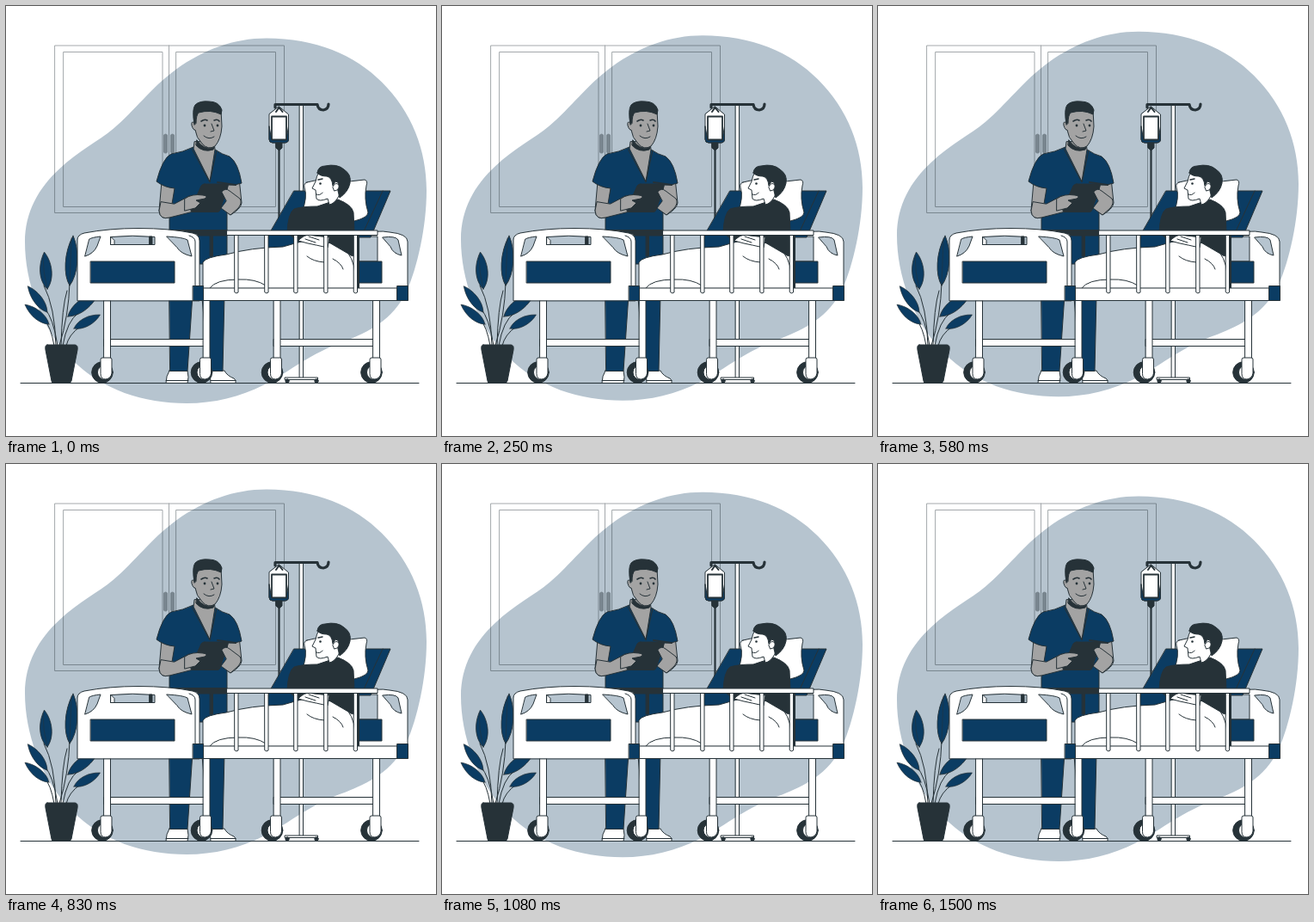
Animation, 500 px wide and 500 px high, one loop 1540 ms. Source, as an HTML page:

```html
<!DOCTYPE html>
<html lang="en">
<head>
<meta charset="utf-8">
<title>Hospital visit</title>
<style>
  html, body { margin: 0; width: 100%; height: 100%; overflow: hidden; background: #fff; }
  svg { display: block; width: 100%; height: 100%; }
  .art { stroke: #263238; stroke-width: 1; stroke-linejoin: round; stroke-linecap: round; }
  .line { fill: none; }
  .white { fill: #fff; }
  .navy { fill: #0b3c63; }
  .dark { fill: #263238; }
  .skin { fill: #a3a3a3; }
  .sky { fill: #b6c4cf; }
</style>
</head>
<body>
<svg viewBox="0 0 500 500">
  <defs>
    <g id="post"><path class="white" d="M0 266h4v67q-2 2-4 0z"/></g>
    <g id="leg">
      <path class="white" d="M0 342h7.500v70H0z"/>
      <circle class="dark" cx="-2" cy="426" r="12.300"/>
      <circle class="white" cx="1" cy="426" r="8.500"/>
      <path class="white" d="M-4 411q0-2 2-2H7q2 0 2 2v16q-1 6-7 7-6 0-6-6z"/>
    </g>
    <g id="frame">
      <path class="white" d="M0 387.500h120v8H0z"/>
      <use href="#leg"/>
      <use href="#leg" x="115.500"/>
    </g>
    <path id="leaf" d="M0 0C-8-9-9-27 1-43 9-31 10-11 0 0z"/>
  </defs>

  <path id="blob" class="sky" d="M303 38C360 38 405 57 437 89C472 124 489 168 489 215C489 258 478 305 466 332C450 366 420 380 395 390C352 405 333 424 300 441C272 455 242 462.500 210 462.500C160 462.500 112 447 77 412C40 375 22 320 22 275C22 240 38 212 62 190C85 168 106 159 125 143C150 122 168 96 198 74C230 51 265 38 303 38Z"/>

  <g class="art">
    <!-- cabinet -->
    <g opacity=".42">
      <path class="line" d="M57 46H323.500V240.500H57zM67 53.500H182V233.500H67zM198 53.500H313.500V233.500H198zM189.500 46V240.500"/>
      <path class="dark" stroke="none" d="M183 150q2.500-3 5 0v20q-2.500 3-5 0zM191 150q2.500-3 5 0v20q-2.500 3-5 0z"/>
    </g>
    <path class="line" d="M17 438.500H480"/>

    <!-- drip stand -->
    <path class="white" d="M341.500 114h4v319h-4z"/>
    <path class="white" d="M324.500 432h38v2.500h-38z"/>
    <circle class="dark" cx="327" cy="436" r="2.200"/><circle class="dark" cx="361" cy="436" r="2.200"/>
    <path class="line" stroke-width="3.200" d="M313 118V114.500H362Q363 121 369 121Q375 120 375 114"/>
    <path class="line" stroke-width="2.200" d="M317.500 166V250"/>
    <path class="white" d="M317.500 117L328.500 126V155Q328.500 159 324 159H310Q306 159 306 155V126z"/>
    <path class="navy" d="M306 140V155Q306 159 310 159H324Q328.500 159 328.500 155V140L326 155H309z"/>
    <path class="white" stroke-width="1.800" d="M309 128.500H326V155.500H309z"/>
    <path class="line" stroke-width="2" d="M314 123l3.500-5 4 5"/>
    <path class="dark" d="M314 159h7v6l-3.500 3-3.500-3z"/>

    <!-- plant -->
    <path class="line" d="M58 395Q57 350 44 325M60 395Q55 362 45 352M62 395Q73 360 74 322M56 395Q52 372 45 366M66 395Q71 366 84 357M70 395Q73 382 86 373M64 395Q65 350 71 331"/>
    <g class="navy" stroke-width=".8">
      <use href="#leaf" transform="translate(48 329) rotate(-6)"/>
      <use href="#leaf" transform="translate(74 325) rotate(3) scale(1 1.350)"/>
      <use href="#leaf" transform="translate(48 356) rotate(-38) scale(.75 .88)"/>
      <use href="#leaf" transform="translate(50 370) rotate(-52) scale(.75 .84)"/>
      <use href="#leaf" transform="translate(72 361) rotate(51) scale(.95 1.050)"/>
      <use href="#leaf" transform="translate(79 375) rotate(61) scale(.75 .8)"/>
    </g>
    <path class="line" stroke-width=".5" d="M48 329Q43 310 43 290M74 325Q75 300 76 270"/>
    <path class="dark" d="M48 394H80Q84 394 83 400L76 436Q75 438.500 73 438.500H56Q53 438.500 53 436L46 400Q45 394 48 394z"/>

    <!-- nurse -->
    <path class="white" d="M190 424h21q2 8 0 14.500H186q0-8 4-14.500zM238 424h16q3 6 11 9 3 2 2 5.500H238q-1-8 0-14.500z"/>
    <path class="line" d="M186 435.500h26M238 435.500h29"/>
    <path class="navy" d="M190 335H217L211 424.500H191zM228 335H254L252 424.500H236z"/>
    <path class="skin" d="M181 204L178 238Q179 249 190 246L230 236 234 222 213 221 194 231 198 204z"/>
    <path class="skin" d="M256 200H271L274 229Q273 236 261 243L249 234 250 216 257 213z"/>
    <path class="navy" d="M218 164Q206 170 192 172Q182 177 175 204Q184 211 196 212L190 248V300H257V242L256 208Q266 209 274 206Q270 182 260 175Q252 173 243 167z"/>
    <path class="skin" d="M180 228L178 238Q179 249 190 246L230 236 234 222 213 221 196 230z"/>
    <path class="skin" d="M219 158L218 166 237 204 243 167 242 158z"/>
    <path class="line" d="M216 166L237 205 245 168"/>
    <path class="dark" d="M222 156Q231 169 242 164L241 167Q229 171 221 162z"/>
    <path class="skin" d="M219 122L219 136Q215 133 216 139 218 145 220 144Q221 153 228 160 235 168 243 163 250 155 251 140L250 120z"/>
    <path class="dark" d="M219 138Q216 120 220 115 225 110 236 111 248 111 251 121L250 126Q238 120 224 124 221 127 221 136z"/>
    <path class="line" stroke-width="1.600" d="M227 134q4-3 7-1M242 133q4-2 6 1"/>
    <path class="line" d="M239 137l3 8-4 1M230 151q6 5 12 1"/>
    <circle class="dark" stroke="none" cx="231" cy="139" r="1.400"/><circle class="dark" stroke="none" cx="246" cy="139" r="1.400"/>
    <path class="dark" d="M231 207H257Q259 207 258 210L249 237Q248 239.500 246 239.500H217Q214 239 215 236L227 209Q228 207 231 207z"/>
    <path class="skin" d="M208 224Q216 218 229 220 236 221 231 224L221 226 226 229 220 235 208 238zM251 216Q255 211 260 215L272 224Q275 229 270 235L261 243 250 235 256 227z"/>
    <path class="line" stroke-width="2" d="M246 205L267 208"/>

    <!-- far rail -->
    <path class="dark" d="M167 260.500H257V267H167zM237.500 267h3v24h-3z"/>

    <!-- headboard and backrest -->
    <path class="white" d="M408 342V266Q432 260 446 263 467 265 467 274V342z"/>
    <path class="sky" d="M410 268H432V297H410zM438 269Q453 267 456 272L460 290Q450 288 447 280z"/>
    <path class="navy" d="M408 297H437V322H408zM335 215H447L424 269H404L390 294H300L306 265z"/>
    <path class="line" d="M438 215L416 262"/>

    <!-- patient -->
    <path class="white" d="M350 205Q368 200 385 203 402 205 417 202 421 203 419 209 416 224 421 240 421 246 405 250L344 240Q351 222 347 211 346 206 350 205z"/>
    <path class="white" d="M229 328V298Q232 292 256 289 284 281 322 280L350 272 395 278Q410 288 410 328z"/>
    <path class="line" d="M237 328Q244 318 270 318 290 317 302 325M350 291q7 6 20 7M392 281q12 10 14 30M380 294q10 5 12 12"/>
    <path class="dark" d="M327 263Q328 241 335 236 344 233 362 233L386 225Q402 231 404 240L406 286Q405 294 398 288L374 274H340z"/>
    <path class="white" d="M343 270Q350 264 358 267L376 269 374 281Q361 278 351 276L340 273z"/>
    <path class="line" d="M348 271l12 4M352 268l12 4"/>
    <path class="white" d="M364 193Q361 198 360 204L356 212 360 214 361 224Q364 228 374 224L376 231Q382 230 387 221L390 208 384 196z"/>
    <path class="dark" d="M362 194Q363 186 371 186 385 183 393 190 402 196 400 206 398 216 388 223L385 211Q389 205 383 204L380 209Q379 199 373 198 365 198 362 194z"/>
    <path class="white" d="M380 210q3-6 7-2 1 6-5 7z"/>
    <path class="line" d="M361 219q4 2 7-2"/>
    <path class="line" stroke-width="1.500" d="M363 202l5-1"/>
    <circle class="dark" stroke="none" cx="365.500" cy="206.500" r="1.300"/>

    <!-- bed -->
    <use href="#frame" x="114"/>
    <use href="#frame" x="311.500"/>
    <path class="dark" d="M408 266h2.500v62h-2.500z"/>
    <path class="white" d="M229 328H455V342.500H229z"/>
    <path class="navy" d="M455 325.500H467.500V342.500H455z"/>
    <use href="#post" x="266"/><use href="#post" x="301"/><use href="#post" x="335"/>
    <use href="#post" x="370"/><use href="#post" x="404.500"/>
    <path class="white" d="M257 261H432V266.500H257z"/>

    <path class="white" d="M83 342.500V272Q83 266 91 264 120 258.500 154 258.500 190 258.500 217 264 225 266 225 273V342.500z"/>
    <path class="line" d="M220 326V274Q220 269 213 267"/>
    <path class="sky" d="M97 271Q100 269 110 268L106 279Q102 288 92 291zM122 268.500Q147 266 173 268.500V277.500H122zM187 268Q206 269 211 272L216 291Q203 288 199 281z"/>
    <path class="white" d="M122 268.500l4 4V277.500H122z"/>
    <path class="dark" d="M167 268h3v9h-3z"/>
    <path class="navy" d="M98.500 297H196V322H98.500zM217.500 325.500H229.500V342.500H217.500z"/>
  </g>
</svg>
<script>
  const LOOP = 1540, PERIOD = 1500, PHASE = 30, RISE = 10;
  const blob = document.getElementById('blob');

  function draw(now) {
    const p = ((now % LOOP + PHASE) % PERIOD) / PERIOD;
    const lift = RISE * (1 - Math.abs(1 - 2 * p));
    blob.setAttribute('transform', `translate(0 ${-lift})`);
    requestAnimationFrame(draw);
  }
  draw(0);
</script>
</body>
</html>
```
